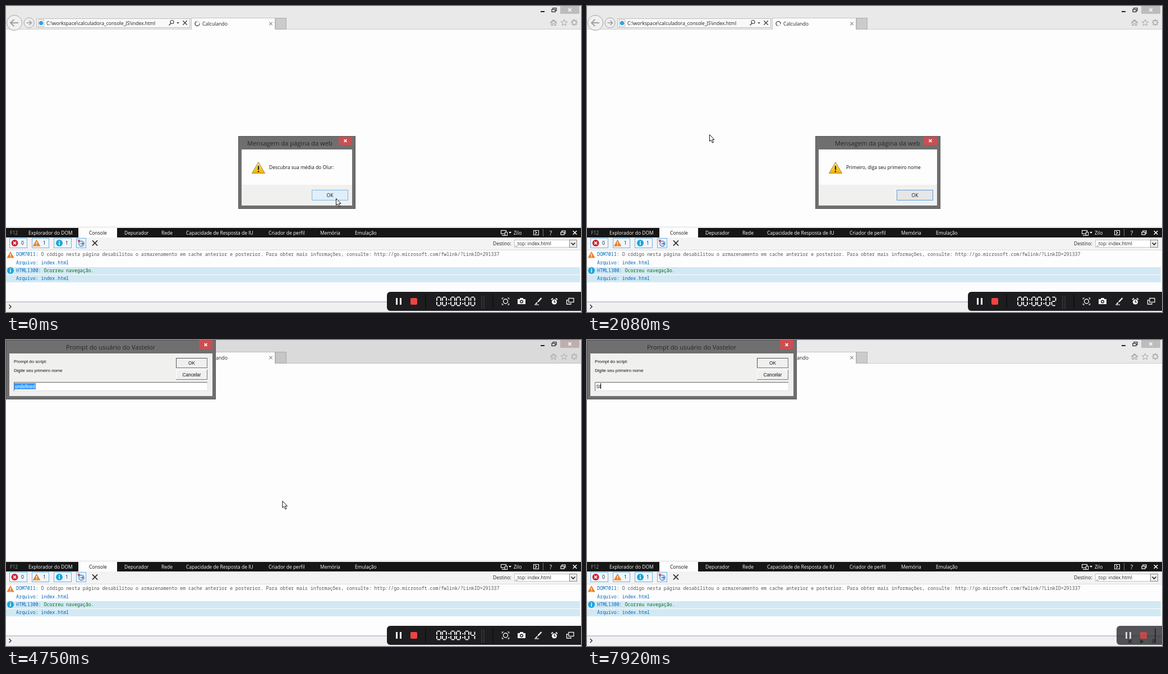
Animation, 1025 px wide and 546 px high, one loop 8 s. Source, as an HTML page with a canvas:

```html
<!DOCTYPE html>
<html lang="pt">
<head>
<meta charset="utf-8">
<title>Calculando</title>
<style>
html, body { margin: 0; width: 100%; height: 100%; overflow: hidden; background: #fdfdfe; }
canvas { display: block; width: 1025px; height: 546px; }
</style>
</head>
<body>
<canvas id="stage" width="1025" height="546"></canvas>
<script>
const c = document.getElementById('stage').getContext('2d');
const LOOP = 8000, TAU = Math.PI * 2;
const UI = '"Open Sans", "Noto Sans", sans-serif';
const MONO = '"Noto Sans Mono", "DejaVu Sans Mono", monospace';
const OLD = '"Liberation Sans", Arial, sans-serif';
const FRAME = '#6f6f6f', RED = '#c94f53', PAGE = '#fdfdfe', FACE = '#f0f0ee';

const clamp = v => Math.max(0, Math.min(1, v));
const ramp = (t, a, b) => clamp((t - a) / (b - a));
const mix = (a, b, u) => a + (b - a) * u;
const smooth = u => u * u * (3 - 2 * u);
const cubic = u => u < .5 ? 4 * u * u * u : 1 - 4 * (1 - u) ** 3;

function box(x, y, w, h, fill, rim) {
  if (fill) { c.fillStyle = fill; c.fillRect(x, y, w, h); }
  if (rim) { c.strokeStyle = rim; c.lineWidth = 1; c.strokeRect(x + .5, y + .5, w - 1, h - 1); }
}
function text(s, x, y, color, size = 8.5, font = UI, align = 'left') {
  c.font = size + 'px ' + font;
  c.textAlign = align;
  c.fillStyle = color;
  c.fillText(s, x, y);
}
function line(color, w, ...p) {
  c.strokeStyle = color; c.lineWidth = w;
  c.beginPath();
  for (let i = 0; i < p.length; i += 2) c.lineTo(p[i], p[i + 1]);
  c.stroke();
}
function poly(fill, rim, w, ...p) {
  c.beginPath();
  for (let i = 0; i < p.length; i += 2) c.lineTo(p[i], p[i + 1]);
  c.closePath();
  if (fill) { c.fillStyle = fill; c.fill(); }
  if (rim) { c.strokeStyle = rim; c.lineWidth = w; c.stroke(); }
}
function disc(x, y, r, fill, rim, w = 1, a = 0, b = TAU) {
  c.beginPath(); c.arc(x, y, r, a, b);
  if (fill) { c.fillStyle = fill; c.fill(); }
  if (rim) { c.strokeStyle = rim; c.lineWidth = w; c.stroke(); }
}
function cross(x, y, r, color, w) {
  line(color, w, x - r, y - r, x + r, y + r);
  line(color, w, x - r, y + r, x + r, y - r);
}
function windows(x, y, color) {
  c.strokeStyle = color; c.lineWidth = 1.2;
  c.strokeRect(x - 4, y - 1, 6, 4.5);
  line(color, 1.2, x - 2, y - 1.5, x - 2, y - 3.5, x + 4, y - 3.5, x + 4, y + 1.5, x + 2, y + 1.5);
}
function arrow(x, y, r, d, color, w) {
  line(color, w, x - d * r, y, x + d * r, y);
  line(color, w, x + d * r * .1, y - r * .85, x + d * r, y, x + d * r * .1, y + r * .85);
}

// Browser frame; on goes from 0 (inactive) to 1 (active)
function chrome(on, t) {
  const g = (a, b) => { const v = Math.round(mix(a, b, on)); return `rgb(${v},${v},${v})`; };
  box(0, 0, 1025, 42, g(233, 116));
  line(g(205, 100), 1, 0, 41.5, 1025, 41.5);
  disc(15, 30, 13.5, g(240, 104), g(165, 80));
  arrow(15, 30, 7, -1, g(160, 250), 2);
  disc(41, 30, 9, g(238, 108), g(165, 85));
  arrow(41, 30, 4.5, 1, g(160, 235), 1.6);

  box(54, 22, 274, 17, g(249, 207), g(190, 150));
  box(57, 24, 11, 13, '#fff', '#bbb');
  disc(62.5, 30.5, 3.8, '#35a0dc');
  text('C:\\workspace\\calculadora_console_JS\\index.html', 72, 34, '#222', 8.6);
  disc(296, 28.5, 3, null, '#444', 1.2);
  line('#444', 1.4, 294, 31, 290.5, 34.5);
  poly('#555', null, 0, 304, 29, 309, 29, 306.5, 32);
  cross(319, 30, 3.7, '#444', 1.4);

  box(330, 21, 150, 21, PAGE, g(195, 120));
  box(331, 40, 148, 2, PAGE);
  const a = t / 900 * TAU;
  disc(341, 31.5, 4, null, '#d0d0d0', 1.4);
  disc(341, 31.5, 4, null, '#5c5c5c', 1.4, a, a + 4.4);
  text('Calculando', 350, 35, '#222', 8.7);
  cross(472, 31.5, 2.8, '#8a8a8a', 1.1);
  box(480, 21, 20, 21, g(203, 160), g(175, 125));

  line('#222', 2, 953, 10, 960, 10);
  windows(977, 7, '#222');
  box(988, 0, 34, 14, '#bcbcbc');
  c.globalAlpha = on;
  box(988, 0, 34, 14, RED);
  c.globalAlpha = 1;
  cross(1005, 7, 2.7, '#fff', 1.5);

  const ink = g(165, 255), fill = on > .5 ? ink : null;
  line(ink, 1.2, 970, 30, 976, 24.5, 982, 30);
  poly(fill, ink, 1.1, 972, 29.5, 976, 26, 980, 29.5, 980, 34.5, 977.5, 34.5, 977.5, 31, 974.5, 31, 974.5, 34.5, 972, 34.5);
  const star = [];
  for (let i = 0; i < 10; i++) {
    const r = i % 2 ? 2.6 : 6, k = i * TAU / 10 - TAU / 4;
    star.push(995 + r * Math.cos(k), 30 + r * Math.sin(k));
  }
  poly(fill, ink, 1, ...star);
  disc(1013, 29.5, 3.5, null, ink, on > .5 ? 2.4 : 1.3);
  for (let i = 0; i < 8; i++) {
    const x = Math.cos(i * TAU / 8), y = Math.sin(i * TAU / 8);
    line(ink, 1.7, 1013 + x * 4, 29.5 + y * 4, 1013 + x * 6, 29.5 + y * 6);
  }
}

function warn(x, y, r, fill, rim, mark) {
  poly(fill, rim, 1, x, y - r, x + r * 1.1, y + r * .9, x - r * 1.1, y + r * .9);
  line(mark, r * .22, x, y - r * .35, x, y + r * .32);
  box(x - r * .11, y + r * .48, r * .22, r * .22, mark);
}
function info(x, y) {
  disc(x, y, 6, '#1ba6d8');
  box(x - .8, y - 1.3, 1.6, 4.8, '#fff');
  box(x - .8, y - 3.7, 1.6, 1.6, '#fff');
}

function devtools() {
  box(0, 393, 1025, 3, '#f0f0f0');
  box(0, 396, 1025, 17, '#161616');
  box(129, 396, 69, 17, PAGE);
  const tabs = [['F12', 7], ['Explorador do DOM', 40], ['Console', 148], ['Depurador', 211], ['Rede', 277],
    ['Capacidade de Resposta de IU', 321], ['Criador de perfil', 468], ['Memória', 560], ['Emulação', 622], ['Zilo', 905]];
  tabs.forEach(([s, x], i) => text(s, x, 407.5, i === 0 ? '#999' : i === 2 ? '#111' : '#fff'));
  c.strokeStyle = '#fff'; c.lineWidth = 1.1;
  c.strokeRect(882.5, 400.5, 9, 6);
  line('#fff', 1.1, 884, 409.5, 889, 409.5);
  box(889, 403, 5, 7, '#161616', '#fff');
  poly('#fff', null, 0, 896, 403, 901, 403, 898.5, 406);
  box(940, 400, 10, 9, null, '#fff');
  line('#fff', 1.1, 943, 402, 946, 404.5, 943, 407);
  line('#777', 1, 957.5, 398, 957.5, 411);
  text('?', 971, 408.5, '#fff', 10.5, UI, 'center');
  windows(993, 404.5, '#fff');
  cross(1014, 404.5, 3.3, '#fff', 1.6);

  box(0, 413, 1025, 22, '#f3f3f3');
  [[6, 32], [46, 31], [85, 32], [125, 18]].forEach(([x, w]) => box(x, 414, w, 18, '#eef6fc', '#6fb0e2'));
  disc(15.5, 423, 6, '#d02030'); cross(15.5, 423, 2.4, '#fff', 1.6);
  text('0', 27, 426, '#222');
  warn(54.5, 423, 6.3, '#e8822a', null, '#fff');
  text('1', 66, 426, '#222');
  info(95, 423);
  text('1', 106, 426, '#222');
  disc(134.5, 424, 4.6, null, '#2f6fc0', 1.2);
  arrow(135, 424, 2.8, 1, '#2f6fc0', 1.2);
  cross(130, 419, 2, '#d02030', 1.2);
  cross(158.5, 423, 4.6, '#333', 1.7);
  text('Destino:', 868, 427, '#222');
  box(906, 417, 112, 14, '#fff', '#c4c4c4');
  text('_top: index.html', 908, 427, '#222');
  box(1004, 417, 14, 14, '#ececec', '#888');
  line('#222', 1.6, 1007.5, 422.5, 1011, 426, 1014.5, 422.5);

  box(0, 435, 1025, 93, PAGE);
  line('#dcdcdc', 1, 0, 435.5, 1025, 435.5);
  box(0, 466, 1023, 13, '#d2e9f4');
  box(0, 480, 1023, 13, '#d2e9f4');
  warn(8, 444, 6, '#e8822a', null, '#fff');
  info(8, 472);
  const log = (s, x, y, col) => text(s, x, y, col, 8.25, MONO);
  log('DOM7011:', 18, 446, '#0066b8');
  log('O código nesta página desabilitou o armazenamento em cache anterior e posterior. Para obter mais informações, consulte: http://go.microsoft.com/fwlink/?LinkID=291337', 62.6, 446, '#555');
  log('Arquivo: index.html', 18, 460.5, '#0066b8');
  log('HTML1300:', 18, 475, '#0066b8');
  log('Ocorreu navegação.', 67.5, 475, '#0b6a1c');
  log('Arquivo: index.html', 18, 489, '#0066b8');

  box(0, 527, 1025, 2, '#c9c9da');
  box(0, 529, 1025, 17, '#f0f0f0');
  line('#333', 1.5, 5.5, 533, 9, 536.5, 5.5, 540);
  cross(968, 538, 3, '#333', 1.4);
  poly('#1f8a2c', null, 0, 986, 534, 993, 538, 986, 542);
  line('#333', 1.2, 1007, 537, 1010, 534, 1013, 537);
  line('#333', 1.2, 1007, 541, 1010, 538, 1013, 541);
}

function frame(x, y, w, h, title, tx, ty) {
  box(x, y, w, h, FRAME, '#565656');
  text(title, tx, ty, '#262626', 11.15);
}

function alertBox(x, w, title, tx, msg, bx, pos, press) {
  frame(x, 232, w, 130, title, tx, 248.5);
  const r = x + w - 6;
  box(r - 24, 233, 24, 15, RED);
  cross(r - 12, 240.5, 2.4, '#fff', 1.5);
  box(x + 6, 256, w - 12, 63, PAGE);
  box(x + 6, 319, w - 12, 37, FACE);
  const g = c.createLinearGradient(0, 278, 0, 299);
  g.addColorStop(0, '#ffe873'); g.addColorStop(1, '#efb000');
  warn(x + 36, 289, 10.5, g, '#9a8a55', '#222');
  text(msg, x + 55, 290.5, '#111');
  const over = pos[0] >= bx && pos[0] < bx + 65 && pos[1] >= 329 && pos[1] < 347;
  box(bx, 328, 65, 19, press ? '#c9e3f6' : over ? '#e0eff9' : '#e6e6e6', over && !press ? '#7eb4ea' : '#5a9be0');
  text('OK', bx + 32.5, 340.5, '#111', 8.5, UI, 'center');
}

function oldButton(y, label, main) {
  box(303, y, 56, 18, '#f0f0f0', main ? '#555' : '#fff');
  line('#777', 1, 303, y + 17.5, 358.5, y + 17.5, 358.5, y);
  text(label, 331, y + 12, '#111', 8.2, OLD, 'center');
}

const keys = [[5920, 'S'], [6690, 'Sy'], [7180, 'S'], [7600, 'St']];

function promptBox(t) {
  frame(0, 0, 374, 106, 'Prompt do usuário do Vastelor', 107, 16.5);
  box(344, 0, 24, 17, RED);
  cross(356, 8.5, 2.4, '#fff', 1.5);
  box(6, 24, 362, 76, FACE);
  text('Prompt do script:', 14, 40.5, '#111', 7.8, OLD);
  text('Digite seu primeiro nome', 14, 57, '#111', 7.8, OLD);
  oldButton(32, 'OK', true);
  oldButton(53, 'Cancelar', false);
  box(14, 75, 346, 16, '#fff', '#e0e0e0');
  line('#666', 1, 14.5, 91, 14.5, 75.5, 359, 75.5);
  const key = keys.filter(k => k[0] <= t).pop();
  if (!key) {
    box(15, 77, 38, 11, '#3399ff');
    text('undefined', 16, 85.5, '#fff', 8.2, OLD);
  } else {
    text(key[1], 16.5, 85.5, '#111', 8.2, OLD);
    const w = c.measureText(key[1]).width;
    if (t - key[0] < 530) box(Math.round(16.5 + w), 77, 1, 10, '#000');
  }
}

// Segments lit per digit, 0 to 5
const SEGS = ['abcdef', 'bc', 'abdeg', 'abcdg', 'bcfg', 'acdfg'];
function digit(n, x, y) {
  const p = { a: [1, 0, 6, 0], b: [7, 1, 7, 6.5], c: [7, 8.5, 7, 14], d: [1, 15, 6, 15], e: [0, 8.5, 0, 14], f: [0, 1, 0, 6.5], g: [1, 7.5, 6, 7.5] };
  for (const s of SEGS[n]) {
    const [x0, y0, x1, y1] = p[s];
    line('#fff', 1.8, x + x0, y + y0, x + x1, y + y1);
  }
}

function recorder(t) {
  const dx = 265 * cubic(ramp(t, 4950, 5800));
  const right = t > 5000 && t < 5500 ? 1016 : 1025;
  c.save();
  c.beginPath(); c.rect(0, 500, right, 46); c.clip();
  c.globalAlpha = mix(1, .75, ramp(t, 6690, 7920));
  c.translate(dx, 0);
  c.fillStyle = '#1d1d20';
  c.beginPath(); c.roundRect(679, 510, 360, 34, 6); c.fill();
  box(695, 521, 3, 12, '#fff'); box(702, 521, 3, 12, '#fff');
  c.fillStyle = '#f04444';
  c.beginPath(); c.roundRect(721, 521, 12, 12, 2); c.fill();
  line('#0c0c0e', 1.5, 748, 515, 748, 540);
  line('#0c0c0e', 1.5, 868, 515, 868, 540);
  for (let y = 517; y < 539; y += 3) { box(847, y, 2, 2, '#3b3b40'); box(851, y, 2, 2, '#3b3b40'); }
  const sec = [1250, 2050, 3200, 4220, 5300].filter(k => t >= k).length;
  [768, 778, 793, 803, 818, 828.5].forEach((x, i) => digit(i === 5 ? sec : 0, x, 519.5));
  [789, 814].forEach(x => { box(x - .5, 523, 2, 2, '#fff'); box(x - .5, 530, 2, 2, '#fff'); });

  const w = '#f4f4f4';
  disc(890.5, 527, 4, null, w, 1.4);
  for (const sx of [-1, 1]) for (const sy of [-1, 1])
    line(w, 1.2, 890.5 + sx * 6, 527 + sy * 3.5, 890.5 + sx * 6, 527 + sy * 6, 890.5 + sx * 3.5, 527 + sy * 6);
  box(912, 523, 14, 9, w); box(916, 521, 6, 2, w);
  disc(919, 527.5, 3, '#1d1d20'); disc(919, 527.5, 1.6, w);
  line(w, 2.4, 954.5, 521, 948, 528);
  line(w, 2, 947, 529, 944, 532);
  line(w, 1.2, 942, 533, 950, 533);
  disc(977.5, 528, 4.6, w);
  line('#1d1d20', 1.2, 977.5, 525, 977.5, 528.5, 980, 528.5);
  line(w, 1.8, 972, 524, 975, 521.5); line(w, 1.8, 980, 521.5, 983, 524);
  c.strokeStyle = w; c.lineWidth = 1.3;
  c.strokeRect(1003, 521.5, 9, 7);
  line(w, 1.3, 1002, 525, 999.5, 525, 999.5, 532, 1007, 532, 1007, 530);
  c.restore();
}

const path = [[0, 588, 343], [1000, 588, 343], [1150, 588, 342], [1420, 588, 342], [2060, 218, 229], [2120, 218, 229],
  [2900, 612, 345], [3400, 612, 345], [3900, 599, 343], [4520, 599, 343], [5200, 201, 133], [5260, 201, 133], [5540, 90, 50], [5760, 40, 76]];
function pointer(t) {
  let i = 0;
  while (i < path.length - 2 && t >= path[i + 1][0]) i++;
  const [a, b] = [path[i], path[i + 1]], u = smooth(ramp(t, a[0], b[0]));
  return [mix(a[1], b[1], u), mix(a[2], b[2], u)];
}
function cursor(t, [x, y]) {
  if (t >= keys[0][0]) return;
  if (t > 5540 && y >= 72) {
    line('#222', 1, x, y + 1, x, y + 12);
    line('#222', 1, x - 2, y + .5, x + 2, y + .5);
    line('#222', 1, x - 2, y + 12.5, x + 2, y + 12.5);
    return;
  }
  poly('#fff', '#111', 1, ...[0, 0, 0, 12, 2.7, 9.6, 5, 14.6, 7, 13.7, 4.9, 9, 8.5, 9].map((v, i) => v + (i % 2 ? y : x) + .5));
}

function draw(t) {
  c.globalAlpha = 1;
  box(0, 0, 1025, 546, PAGE);
  const on = ramp(t, 1350, 1480) - ramp(t, 1700, 1850) + ramp(t, 4340, 4430) - ramp(t, 4620, 4770);
  chrome(on, t);
  devtools();
  const pos = pointer(t);
  const press = [1150, 4180].some(k => t >= k && t < k + 160);
  const title = 'Mensagem da página da web';
  if (t < 1340) alertBox(414, 209, title, 430, 'Descubra sua média do Olur:', 545, pos, press);
  if (t >= 1690 && t < 4345) {
    c.globalAlpha = ramp(t, 1690, 1830);
    alertBox(407, 223, title, 442, 'Primeiro, diga seu primeiro nome', 552, pos, press);
  }
  if (t >= 4610) {
    c.globalAlpha = ramp(t, 4610, 4750);
    promptBox(t);
  }
  c.globalAlpha = 1;
  recorder(t);
  cursor(t, pos);
  if (press) disc(pos[0], pos[1], 2.6, 'rgba(240,90,100,.25)', 'rgba(235,70,85,.6)', 1);
}

const start = performance.now();
function tick() {
  draw((performance.now() - start) % LOOP);
  requestAnimationFrame(tick);
}
tick();
</script>
</body>
</html>
```
